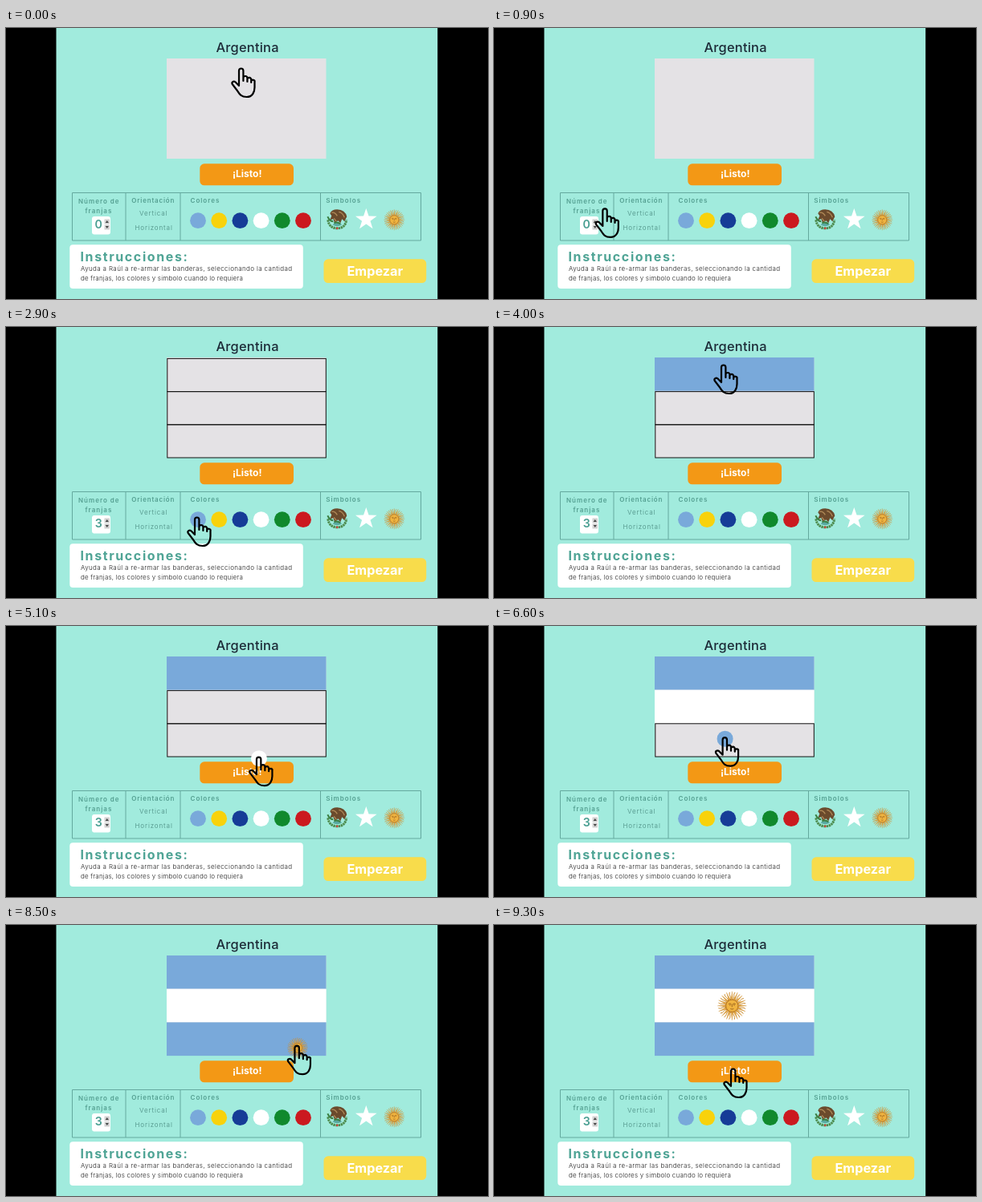
These frames come from a looping animation (600 px wide and 338 px high, 9400 ms). An HTML page:

```html
<!DOCTYPE html>
<html lang="es">
<head>
<meta charset="utf-8">
<style>
html, body { margin: 0; width: 100%; height: 100%; overflow: hidden; background: #000; }
svg { display: block; width: 100vw; height: 100vh; }
text { font-family: Inter, "Open Sans", sans-serif; }
.label { font-size: 8px; font-weight: 600; letter-spacing: 1px; fill: #55a092; }
.option { font-size: 8px; letter-spacing: .85px; fill: #5a9d92; }
.bold { font-weight: 700; fill: #fff; text-anchor: middle; }
.body { font-size: 8px; font-weight: 300; letter-spacing: .2px; fill: #222; }
.body.wide { letter-spacing: .36px; }
</style>
</head>
<body>
<svg viewBox="0 0 600 338">
  <defs>
    <g id="sun"></g>
    <g id="arms">
      <path d="M-11.5 1Q-10 11.5 0 11.5Q10 11.5 11.5 1" fill="none" stroke="#4c8a4c" stroke-width="3" stroke-dasharray="2.4 .7"/>
      <path d="M-9 -7Q-7 -12 0 -12Q10 -11.5 12 -3L9 3L6 0L4 5L1 2L-3 5L-5 0L-9 1L-7 -4Z" fill="#6b4a2c"/>
      <path d="M-7 -8Q-3 -9 0 -4M2 -9Q7 -8 9 -2M-4 -1L-1 3" fill="none" stroke="#b08a58" stroke-width="1.3"/>
      <path d="M-6 7Q0 2 6 7Q0 11 -6 7Z" fill="#58a9a0"/>
      <path d="M-12 -3Q-9 3 -5 3M-4 5Q0 3 4 6" fill="none" stroke="#3b7f42" stroke-width="2"/>
      <circle cx="0" cy="11.5" r="1.4" fill="#c5443a"/>
    </g>
  </defs>
  <rect width="600" height="338"/>
  <rect x="62.5" width="474.7" height="338" fill="#a1ebdd"/>
  <text x="300.6" y="30.4" font-size="16.4" font-weight="500" letter-spacing=".25" fill="#1d2b38" text-anchor="middle">Argentina</text>
  <rect x="200" y="38" width="198.5" height="125" fill="#e4e2e5"/>
  <g id="stripes"></g>
  <rect x="241.3" y="169.3" width="116.7" height="27" rx="5.5" fill="#f39815"/>
  <text class="bold" x="300.3" y="186.3" font-size="12">¡Listo!</text>

  <path d="M82.5 205.5H516.5V265H82.5ZM149 205.5V265M217 205.5V265M391.5 205.5V265" fill="none" stroke="#64a99e"/>
  <text class="label" x="90" y="219">Número de</text>
  <text class="label" x="98.5" y="230.5">franjas</text>
  <text class="label" x="156.3" y="217.8" letter-spacing=".8" style="letter-spacing:.8px">Orientación</text>
  <text class="label" x="229.5" y="218.3">Colores</text>
  <text class="label" x="398.3" y="217.7">Simbolos</text>
  <text class="option" x="166" y="233.8">Vertical</text>
  <text class="option" x="160.5" y="251.8">Horizontal</text>
  <rect x="107" y="235" width="23" height="22.5" rx="3" fill="#fff"/>
  <text id="count" x="115.3" y="250.2" font-size="14.2" font-weight="600" fill="#4a9f92" text-anchor="middle">0</text>
  <path d="M122.5 238.5h6.5v6h-6.5zM122.5 245.5h6.5v6h-6.5z" fill="#d2d2d2"/>
  <path d="M123.8 243l2-3 2 3zM123.8 247l2 3 2-3z" fill="#444"/>
  <g id="swatches"></g>
  <use href="#arms" x="412.3" y="238.3"/>
  <path id="star" fill="#fff"/>
  <use href="#sun" transform="translate(483.3 239.3) scale(.72)"/>

  <rect x="79.3" y="270.3" width="290.5" height="54.7" rx="4" fill="#fff"/>
  <text x="92.5" y="290.6" font-size="16" font-weight="700" letter-spacing="1.6" fill="#4fa495">Instrucciones:</text>
  <text class="body wide" x="93" y="302.7">Ayuda a Raúl a re-armar las banderas, seleccionando la cantidad</text>
  <text class="body" x="93" y="314.7">de franjas, los colores y simbolo cuando lo requiera</text>
  <rect x="395.5" y="288.3" width="127.7" height="29.7" rx="5.5" fill="#f8dc4b"/>
  <text class="bold" x="459.3" y="309" font-size="16.3">Empezar</text>

  <use id="flagSun" href="#sun" x="296.3" y="100.8"/>
  <circle id="dot" r="10"/>
  <use id="dragSun" href="#sun"/>
  <g id="hand">
    <path transform="translate(-1.3 -1)" fill="none" stroke="#000" stroke-width="2.2" stroke-linecap="round" stroke-linejoin="round"
      d="M10.3 23V4.2a2.7 2.7 0 0 1 5.4 0V17M15.7 13.5a2.5 2.5 0 0 1 5 0V18M20.7 15.2a2.4 2.4 0 0 1 4.8 .3V19M25.5 17.4a2.2 2.2 0 0 1 4.3 1V25C29.8 31 27 37 20 37C13 37 11 33.5 8.5 29.5L2 21C.8 18.5 3.5 16.5 6 18.5L10.3 23"/>
  </g>
</svg>
<script>
const LOOP = 9400, STEP = 100;
const BLUE = '#79a9da', WHITE = '#fff';
const $ = id => document.getElementById(id);
const show = (el, on) => el.setAttribute('visibility', on ? 'visible' : 'hidden');

function add(parent, tag, attrs) {
  const el = document.createElementNS('http://www.w3.org/2000/svg', tag);
  for (const k in attrs) el.setAttribute(k, attrs[k]);
  return parent.appendChild(el);
}

[BLUE, '#f8d20b', '#163c97', WHITE, '#10892d', '#cb191f'].forEach((fill, i) =>
  add($('swatches'), 'circle', { cx: 239 + i * 26.2, cy: 240.2, r: 9.9, fill }));

const points = Array.from({ length: 10 }, (_, i) => {
  const a = i * Math.PI / 5, r = i % 2 ? 5.5 : 14;
  return (448.3 + r * Math.sin(a)).toFixed(2) + ' ' + (239 - r * Math.cos(a)).toFixed(2);
});
$('star').setAttribute('d', 'M' + points.join('L') + 'Z');

for (let i = 0; i < 32; i++)
  add($('sun'), 'path', {
    d: i % 2 ? 'M-.7 -7Q1.4 -10 0 -12.5Q-1 -15 .4 -17.2' : 'M-1.2 -7L0 -18L1.2 -7Z',
    fill: i % 2 ? 'none' : '#dfa03a', stroke: '#c98a2c', 'stroke-width': i % 2 ? .9 : .3,
    transform: `rotate(${i * 11.25})`
  });
add($('sun'), 'circle', { r: 7.6, fill: '#f0b440', stroke: '#a8671d', 'stroke-width': .8 });
add($('sun'), 'path', {
  d: 'M-4.4 -2.2Q-2.7 -3.5 -1 -2.2M1 -2.2Q2.7 -3.5 4.4 -2.2M-3.5 -.9h1.8M1.7 -.9h1.8M0 -2V1.5M-2 3.7Q0 4.8 2 3.7',
  fill: 'none', stroke: '#8a5218', 'stroke-width': .8
});

const stripes = [
  { on: 1300, fillAt: 3800, fill: BLUE },
  { on: 1800, fillAt: 5500, fill: WHITE },
  { on: 2300, fillAt: 6800, fill: BLUE }
].map((s, i) => ({
  ...s,
  line: add($('stripes'), 'rect', { x: 200.8, y: 39.4 + i * 41.2, width: 197.5, height: 41.2, fill: 'none', stroke: '#111', 'stroke-width': 1 }),
  body: add($('stripes'), 'rect', { x: 200, y: 38 + i * 41.7, width: 198.5, height: 41.7, fill: s.fill })
}));
stripes.forEach(s => $('stripes').append(s.line));

// Hand moves: start, end, x, y
const moves = [
  [0, 1100, 113, 240],
  [2350, 2880, 226, 237],
  [3030, 3745, 274, 47],
  [4170, 4700, 305, 237],
  [4735, 5450, 301, 94],
  [5500, 6000, 226, 237],
  [6030, 6745, 281, 128],
  [7100, 7800, 471, 235],
  [7970, 8870, 282, 102],
  [9250, 9260, 286, 179]
];
const drags = [[3000, 3800, BLUE], [4730, 5500, WHITE], [6000, 6800, BLUE]];

function handAt(t) {
  let x = 281, y = 50;
  for (const [a, b, tx, ty] of moves) {
    if (t <= a) break;
    const e = .5 - .5 * Math.cos(Math.PI * Math.min(1, (t - a) / (b - a)));
    x += (tx - x) * e;
    y += (ty - y) * e;
  }
  return [x, y];
}

function draw(t) {
  const [x, y] = handAt(t);
  $('hand').setAttribute('transform', `translate(${x} ${y})`);

  $('count').textContent = stripes.filter(s => t >= s.on).length;
  for (const s of stripes) {
    show(s.line, t >= s.on && t < s.fillAt);
    show(s.body, t >= s.fillAt);
  }

  const drag = drags.find(([a, b]) => t >= a && t < b);
  show($('dot'), drag);
  if (drag) {
    $('dot').setAttribute('fill', drag[2]);
    $('dot').setAttribute('transform', `translate(${x + 12} ${y + 2})`);
  }

  show($('dragSun'), t >= 7950 && t < 8900);
  $('dragSun').setAttribute('transform', `translate(${x + 12.5} ${y + 3}) scale(.72)`);
  show($('flagSun'), t >= 8900);
}

const start = performance.now();
function tick() {
  const t = (performance.now() - start) % LOOP;
  draw(Math.floor(t / STEP) * STEP);
  requestAnimationFrame(tick);
}
tick();
</script>
</body>
</html>
```
